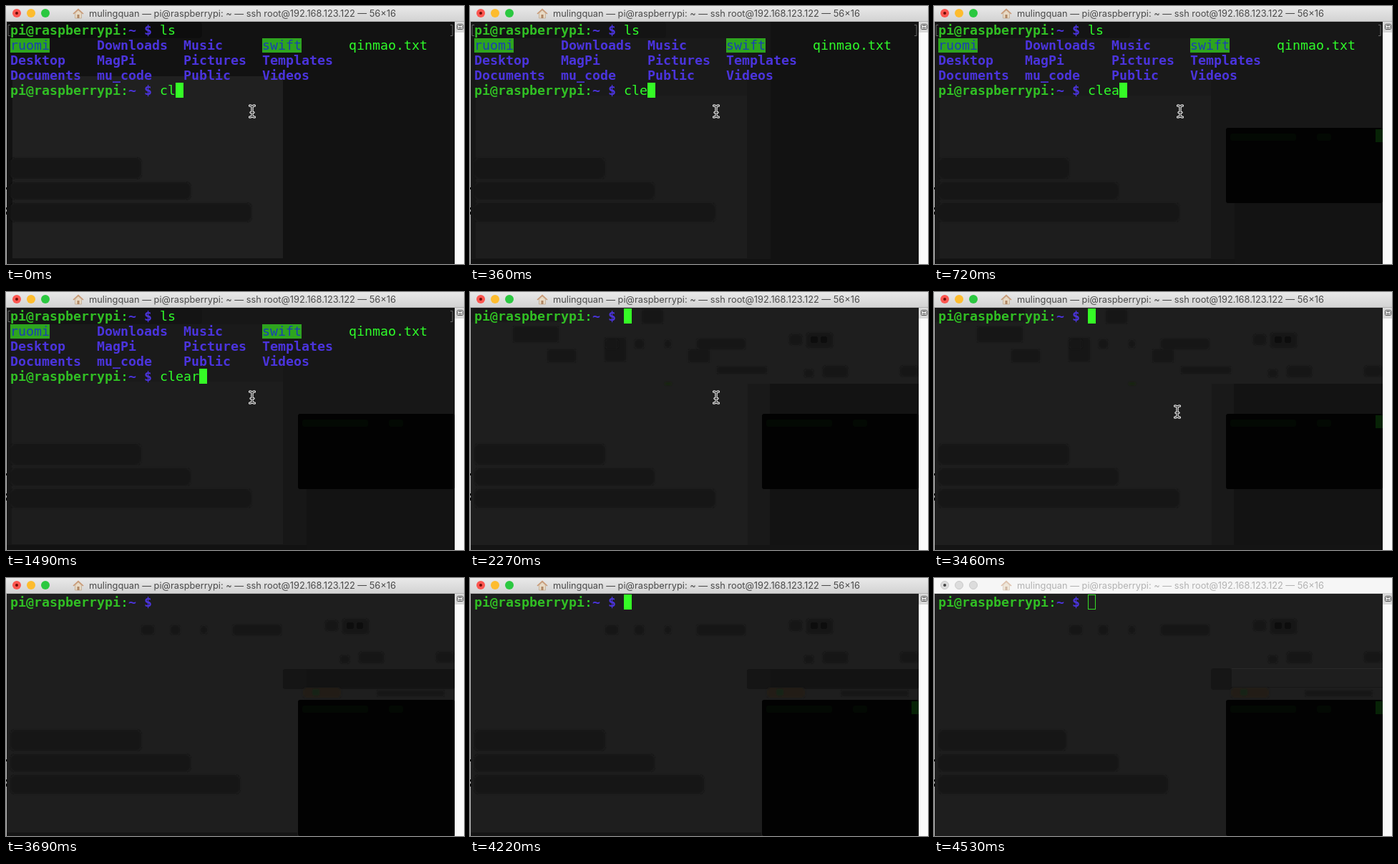
These frames come from a looping animation (640x360 px, 4.63 s). An HTML page:

```html
<!DOCTYPE html>
<html lang="en">
<head>
<meta charset="utf-8">
<title>Terminal</title>
<style>
  html, body { margin: 0; width: 100%; height: 100%; overflow: hidden; background: #121212; }
  svg { display: block; width: 640px; height: 360px; }
  text { white-space: pre; }
  .term text { font: 18.27px "DejaVu Sans Mono", monospace; fill: #2ffb2a; }
  .term .b { font-weight: bold; }
  .term .green { fill: #31bf24; }
  .term .blue { fill: #4b34dd; }
  .term .open { fill: #1a3fb4; }
  .title { font: 12.8px Inter, sans-serif; text-anchor: middle; }
</style>
</head>
<body>
<svg viewBox="0 0 640 360">
  <defs>
    <linearGradient id="bar" x2="0" y2="1">
      <stop stop-color="#e9e9e9"/><stop offset="1" stop-color="#d2d2d2"/>
    </linearGradient>
    <filter id="soft" x="-10%" y="-20%" width="120%" height="140%"><feGaussianBlur stdDeviation="1"/></filter>
  </defs>

  <g id="back"></g>

  <!-- window edges -->
  <path fill="#bdbdbd" d="M0 22h1v338h-1z"/>
  <path fill="#111" d="M0 253h2v3h-2zM0 281h2v3h-2zM0 287h2v4h-2z"/>
  <path fill="#fafafa" d="M627 22h13v338h-13z"/>
  <path fill="#d9d9d9" d="M627 22h13v15h-13z"/>
  <rect x="630.5" y="25.5" width="8" height="7" rx="1" fill="#eee" stroke="#444"/>
  <path stroke="#444" d="M632 27.5h5M632 30.5h5"/>

  <!-- title bar -->
  <g data-on="0-4530">
    <rect width="640" height="22" fill="url(#bar)"/>
    <path stroke="#b4b4b4" d="M0 21.5h640"/>
    <circle cx="15" cy="10" r="6" fill="#fc5650"/>
    <circle cx="15" cy="10" r="2" fill="#6e0d08"/>
    <circle cx="35" cy="10" r="6" fill="#fdbc2e"/>
    <circle cx="55" cy="10" r="6" fill="#2bc840"/>
  </g>
  <g data-on="4530-4630">
    <rect width="640" height="22" fill="#f6f6f6"/>
    <path stroke="#d6d6d6" d="M0 21.5h640"/>
    <g fill="#dcdcdc" stroke="#cacaca">
      <circle cx="15" cy="10" r="5.5"/><circle cx="35" cy="10" r="5.5"/><circle cx="55" cy="10" r="5.5"/>
    </g>
    <circle cx="15" cy="10" r="2" fill="#444"/>
  </g>
  <g id="house">
    <path fill="#ead9c0" stroke="#b79a7c" stroke-width=".7" d="M96.500 10v7h9v-7l-4.500-4z"/>
    <path fill="none" stroke="#c58a5c" stroke-width="1.600" d="M94 11l7-6.500 7 6.500"/>
    <path fill="#a87850" d="M99.500 12h3v5h-3z"/>
  </g>
  <text id="title" class="title" x="330.500" y="15">mulingquan — pi@raspberrypi: ~ — ssh root@192.168.123.122 — 56×16</text>

  <g id="term" class="term"></g>

  <g id="mouse" fill="none" stroke-linecap="round">
    <path id="beam" stroke="#e4e4e4" stroke-width="3" d="M-3.500-8Q0-8 0-5.500Q0-8 3.500-8M0-5.500V5.500M-3.500 8Q0 8 0 5.500Q0 8 3.500 8M-2 1.500H2"/>
    <use href="#beam" style="stroke:#222"/>
    <path stroke="#222" stroke-width="1.100" d="M-3.500-8Q0-8 0-5.500Q0-8 3.500-8M0-5.500V5.500M-3.500 8Q0 8 0 5.500Q0 8 3.500 8M-2 1.500H2"/>
  </g>
</svg>

<script>
const LOOP = 4630, COL = 11, ROW = 21, LEFT = 6, TOP = 23;
const NS = "http://www.w3.org/2000/svg";
const $ = id => document.getElementById(id);

function add(parent, tag, attrs, text) {
  const el = document.createElementNS(NS, tag);
  for (const k in attrs) el.setAttribute(k, attrs[k]);
  if (text) el.textContent = text;
  parent.append(el);
  return el;
}
const group = (parent, on, extra) => add(parent, "g", { "data-on": on, ...extra });
const box = (g, x, y, width, height, fill, rx = 0) =>
  add(g, "rect", { x, y, width, height, fill, rx });

// --- translucent background: ghosts of the windows behind ---
const back = $("back");
const base = (g, fill) => box(g, 1, 22, 626, 338, fill);

function bars(g, fill, first, last) {
  const s = add(g, "g", { filter: "url(#soft)" });
  box(s, 6, 212, first, 29, fill, 6);
  box(s, 6, 246, 252, 24, fill, 6);
  box(s, 6, 275, last, 26, fill, 6);
}

function smudges(g, fill) {
  const s = add(g, "g", { filter: "url(#soft)" });
  box(s, 446, 59, 18, 15, fill, 5);
  box(s, 470, 57, 37, 21, fill, 5);
  box(s, 467, 108, 13, 11, fill, 4);
  box(s, 493, 103, 35, 16, fill, 5);
  box(s, 601, 103, 25, 15, fill, 5);
  box(s, 476, 62, 10, 9, "#0c0c0c", 4);
  box(s, 490, 62, 9, 9, "#0c0c0c", 4);
}

function words(g, fill) {
  const s = add(g, "g", { filter: "url(#soft)" });
  box(s, 189, 66, 18, 13, fill, 4);
  box(s, 230, 66, 13, 13, fill, 4);
  box(s, 272, 67, 9, 11, fill, 4);
  box(s, 317, 65, 68, 15, fill, 4);
}

function hole(on, height, opacity = 1) {
  const g = group(back, on, { opacity });
  box(g, 408, 170, 219, height, "#020202", 3);
  box(g, 414, 178, 92, 10, "#030903", 3);
  box(g, 535, 178, 20, 10, "#030903", 3);
}

let g = group(back, "0-60");
base(g, "#121212");
box(g, 2, 22, 272, 23, "#0d0d0d", 5);
box(g, 9, 98, 378, 254, "#202020");
bars(g, "#141414", 183, 337);

g = group(back, "60-2210");
base(g, "#171717");
box(g, 8, 45, 379, 307, "#1d1d1d");
box(g, 8, 45, 379, 80, "#1a1a1a");
box(g, 2, 22, 272, 23, "#141414", 5);
bars(g, "#181818", 183, 337);
box(group(back, "60-660"), 420, 22, 207, 338, "#121212");
box(group(back, "660-2210"), 420, 275, 207, 85, "#131313");
box(g, 1, 353, 626, 7, "#121212");

g = group(back, "2210-3570");
base(g, "#1e1e1e");
box(g, 388, 128, 239, 232, "#191919");
box(g, 419, 128, 208, 232, "#131313");
box(g, 1, 353, 626, 7, "#141414");
let s = add(g, "g", { filter: "url(#soft)" });
for (const [x, y, w, h] of [[2, 23, 125, 18], [60, 48, 64, 22], [188, 64, 30, 33],
  [108, 80, 40, 18], [305, 80, 30, 18], [345, 104, 70, 10], [240, 24, 30, 20]])
  box(s, x, y, w, h, "#191919", 3);
box(s, 272, 126, 10, 4, "#15240f", 2);
words(g, "#181818");
smudges(g, "#151515");
bars(g, "#191919", 183, 337);

g = group(back, "3570-4530");
base(g, "#1e1e1e");
box(g, 387, 127, 240, 28, "#151515", 3);
box(g, 420, 127, 207, 26, "#131313");
box(g, 1, 355, 406, 5, "#151515");
words(g, "#171717");
smudges(g, "#151515");
bars(g, "#171717", 183, 321);

g = group(back, "4530-4630");
base(g, "#1e1e1e");
box(g, 387, 126, 29, 30, "#161616", 4);
box(g, 416, 126, 211, 1, "#292929");
box(g, 416, 152, 211, 1, "#171717");
words(g, "#171717");
smudges(g, "#151515");
bars(g, "#181818", 179, 321);

g = group(back, "3570-4630", { filter: "url(#soft)" });
box(g, 415, 153, 53, 14, "#201d17", 4);
box(g, 428, 155, 10, 9, "#182312", 3);
box(g, 518, 157, 95, 8, "#191919", 3);

hole("660-720", 105, .6);
hole("720-3570", 105);
hole("3570-4630", 190);
for (const on of ["720-1490", "2500-3510", "4160-4630"])
  box(group(back, on), 617, 172, 10, 18, "#072306");

// --- terminal text ---
const term = $("term");
const put = (g, col, row, str, cls = "") =>
  add(g, "text", { x: LEFT + col * COL, y: TOP + row * ROW + 17, class: cls }, str);

function prompt(g, row) {
  put(g, 0, row, "pi@raspberrypi", "b green");
  put(g, 14, row, ":", "");
  put(g, 15, row, "~ $", "b blue");
}

const list = group(term, "0-2210");
prompt(list, 0);
put(list, 19, 0, "ls");
[[0, "ruomi"], [32, "swift"]].forEach(([col, name]) => {
  box(list, LEFT + col * COL, TOP + ROW + 1, 55, 20, "#2ea51f");
  put(list, col, 1, name, "open");
});
put(list, 43, 1, "qinmao.txt");
[[0, 2, "Desktop", "Documents"], [11, 1, "Downloads", "MagPi", "mu_code"],
 [22, 1, "Music", "Pictures", "Public"], [32, 2, "Templates", "Videos"]]
  .forEach(([col, row, ...names]) =>
    names.forEach((name, i) => put(list, col, row + i, name, "b blue")));
prompt(list, 4);
add(list, "path", { d: "M6 26.500h-3v15h3M621 26.500h3v15h-3", fill: "none", stroke: "#666" });

const typed = put(list, 19, 4, "cl");
prompt(group(term, "2210-4630"), 0);

const cursor = box(term, 0, 0, COL, ROW, "#35fb26");
add(group(term, "4530-4630"), "rect",
  { x: 215.5, y: 23.5, width: 10, height: 20, fill: "none", stroke: "#35dd26" });

// --- timeline ---
const at = (steps, t) => steps.filter(step => step[0] <= t).pop();
const typing = [[0, 2], [360, 3], [660, 4], [1130, 5]];
const blink = [[0, 1], [1730, 0], [2210, 1], [3570, 0], [4160, .6], [4220, 1], [4530, 0]];
const path = [[0, 344, 147], [3460, 340, 167], [3510, 335, 217],
              [3570, 327, 289], [3630, 322, 345], [3690, 322, 400]];

const timed = [...document.querySelectorAll("[data-on]")].map(el =>
  [el, ...el.dataset.on.split("-").map(Number)]);

function draw(t) {
  for (const [el, from, to] of timed)
    el.style.display = t >= from && t < to ? "" : "none";

  const n = at(typing, t)[1], cleared = t >= 2210;
  typed.textContent = "clear".slice(0, n);
  cursor.setAttribute("x", LEFT + (19 + (cleared ? 0 : n)) * COL);
  cursor.setAttribute("y", TOP + (cleared ? 0 : 4 * ROW));
  cursor.setAttribute("opacity", at(blink, t)[1]);

  const [, x, y] = at(path, t);
  $("mouse").setAttribute("transform", `translate(${x} ${y})`);

  const idle = t >= 4530;
  $("title").setAttribute("fill", idle ? "#b2b2b2" : "#4a4a4a");
  $("house").setAttribute("opacity", idle ? .5 : .85);
}

const start = performance.now();
function tick(now) {
  draw(Math.max(0, now - start) % LOOP);
  requestAnimationFrame(tick);
}
draw(0);
requestAnimationFrame(tick);
</script>
</body>
</html>
```
